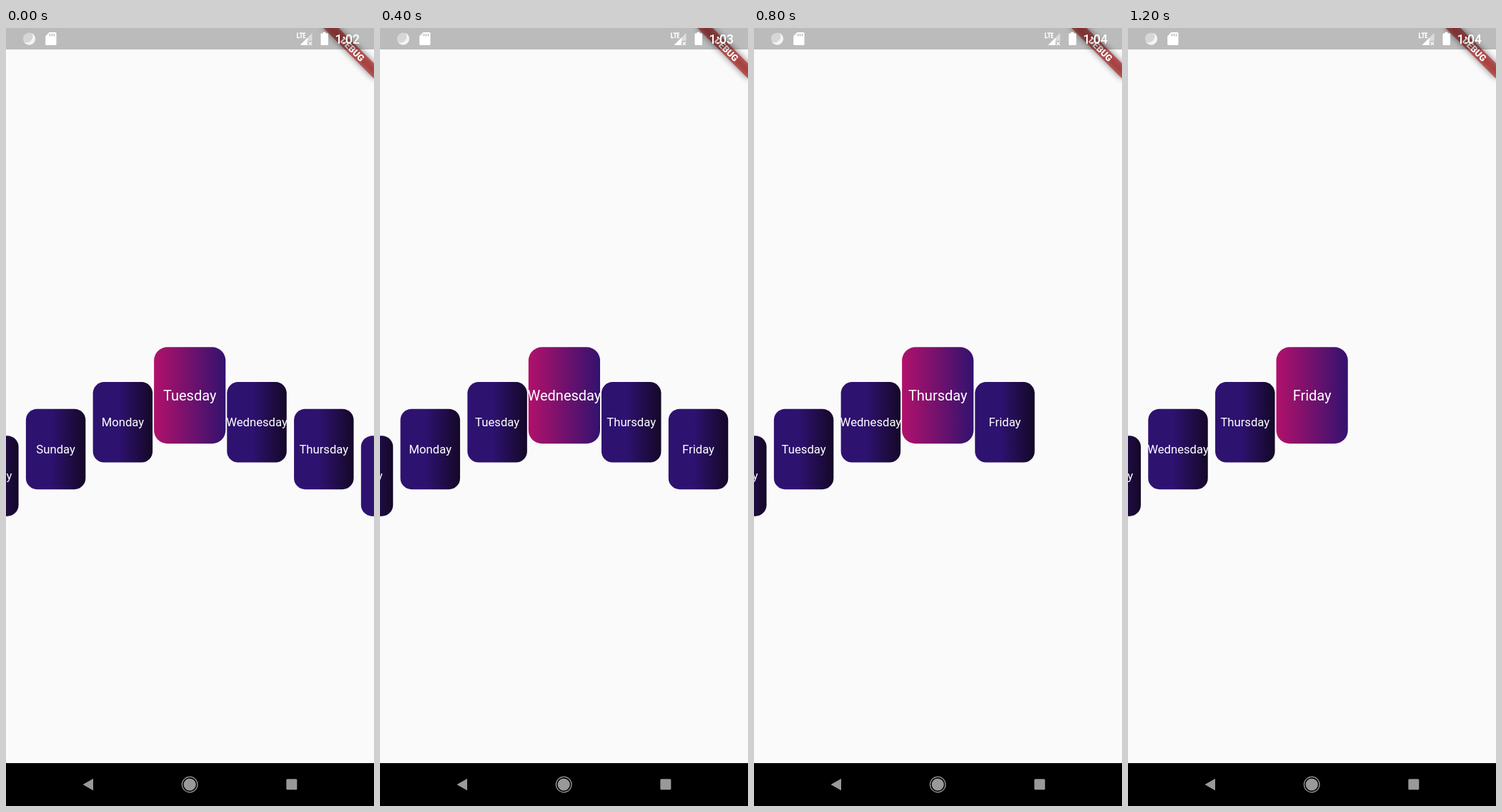
An HTML page for the animation above (1600 ms loop, 515x1088 px).

```html
<!DOCTYPE html>
<html lang="en">
<head>
<meta charset="utf-8">
<title>Weekday carousel</title>
<style>
  html, body { margin: 0; height: 100%; overflow: hidden; background: #fafafa; }
  svg { display: block; width: 100%; height: 100%; font-family: Roboto, sans-serif; }
  text { fill: #fff; }
  .card text { font-size: 20px; text-anchor: middle; }
</style>
</head>
<body>
<svg viewBox="0 0 515 1088">
  <defs>
    <linearGradient id="active">
      <stop stop-color="#b1116b"/><stop offset="1" stop-color="#33126f"/>
    </linearGradient>
    <linearGradient id="idle">
      <stop offset=".42" stop-color="#2e1270"/><stop offset="1" stop-color="#140827"/>
    </linearGradient>
    <filter id="blur" x="-50%" y="-150%" width="200%" height="400%">
      <feGaussianBlur stdDeviation="5"/>
    </filter>
  </defs>
  <rect width="515" height="1088" fill="#fafafa"/>
  <g id="cards"></g>

  <g transform="translate(515 0) rotate(45)">
    <rect x="-50" y="35" width="100" height="15" opacity=".5" filter="url(#blur)"/>
    <rect x="-50" y="35" width="100" height="15" fill="#b71c1c" fill-opacity=".627"/>
    <text y="47.1" font-size="12.77" font-weight="900" text-anchor="middle">DEBUG</text>
  </g>

  <g id="status-bar" fill="#fff">
    <rect width="515" height="30" fill="#000" fill-opacity=".255"/>
    <circle cx="32.5" cy="15" r="8.6" fill="#d6d6d6"/>
    <path d="M36 7.2A8.6 8.6 0 1 1 25 19.5A8.6 8.6 0 0 0 36 7.2Z" fill="#f4f4f4"/>
    <path d="M60.5 6H69q1.5 0 1.5 1.5v15q0 1.5-1.5 1.5H56.700q-1.500 0-1.500-1.500V11.500Z"/>
    <path d="M61.500 8v3.500M64.500 8v3.500M67.500 8v3.500" stroke="#bababa" stroke-width="1.500"/>
    <path d="M407.700 6.500V13.500H411M410.500 7.200H415.500M413 7.200V14.200M419 7.200H416.400V13.500H419M416.400 10.300H418.700"
      fill="none" stroke="#fff" stroke-width="1.400"/>
    <path d="M428.500 7V18H422V24H411.500Z" fill="#dcdcdc"/>
    <path d="M422 13.500V24H411.500Z"/>
    <path d="M423.500 19.500l4.500 4.500m0-4.500l-4.500 4.500" stroke="#fff" stroke-width="1.300"/>
    <path d="M443.500 7.500V5.700H447.500V7.500H450q1 0 1 1V23q0 1-1 1H441.500q-1 0-1-1V8.500q0-1 1-1Z"/>
    <text id="clock" x="460.500" y="22" font-size="17.500" font-weight="500"></text>
  </g>

  <g id="nav-bar" fill="#999">
    <rect y="1028" width="515" height="60" fill="#000"/>
    <path d="M107.500 1058L122 1049.800V1066.200Z"/>
    <circle cx="257.200" cy="1058" r="8.600"/>
    <circle cx="257.200" cy="1058" r="10.800" fill="none" stroke="#999" stroke-width="1.300"/>
    <rect x="392.300" y="1050.300" width="15" height="15" rx="1.500"/>
  </g>
</svg>
<script>
const days = ["Saturday", "Sunday", "Monday", "Tuesday", "Wednesday", "Thursday", "Friday"];
const clockTimes = ["1:02", "1:03", "1:04", "1:04"];
const centers = [257.2, 257.9, 257.2, 257.6];
const firstDay = 3, stepMs = 400;
const cardGroup = document.getElementById("cards");
const clock = document.getElementById("clock");

function card(day, distance, centerX) {
  const x = centerX + 93.8 * distance;
  const y = 513.8 + 37.55 * Math.abs(distance);
  const scale = distance ? 5 / 6 : 1;
  return `<g class="card" transform="translate(${x} ${y}) scale(${scale})">
    <rect x="-50.1" y="-67.5" width="100.2" height="135" rx="18.8" fill="url(#${distance ? "idle" : "active"})"/>
    <text y="7">${day}</text></g>`;
}

let shown = -1;
function draw() {
  const step = Math.floor(performance.now() / stepMs) % clockTimes.length;
  if (step !== shown) {
    shown = step;
    clock.textContent = clockTimes[step];
    cardGroup.innerHTML = days
      .map((day, i) => card(day, i - firstDay - step, centers[step]))
      .join("");
  }
  requestAnimationFrame(draw);
}
draw();
</script>
</body>
</html>
```
